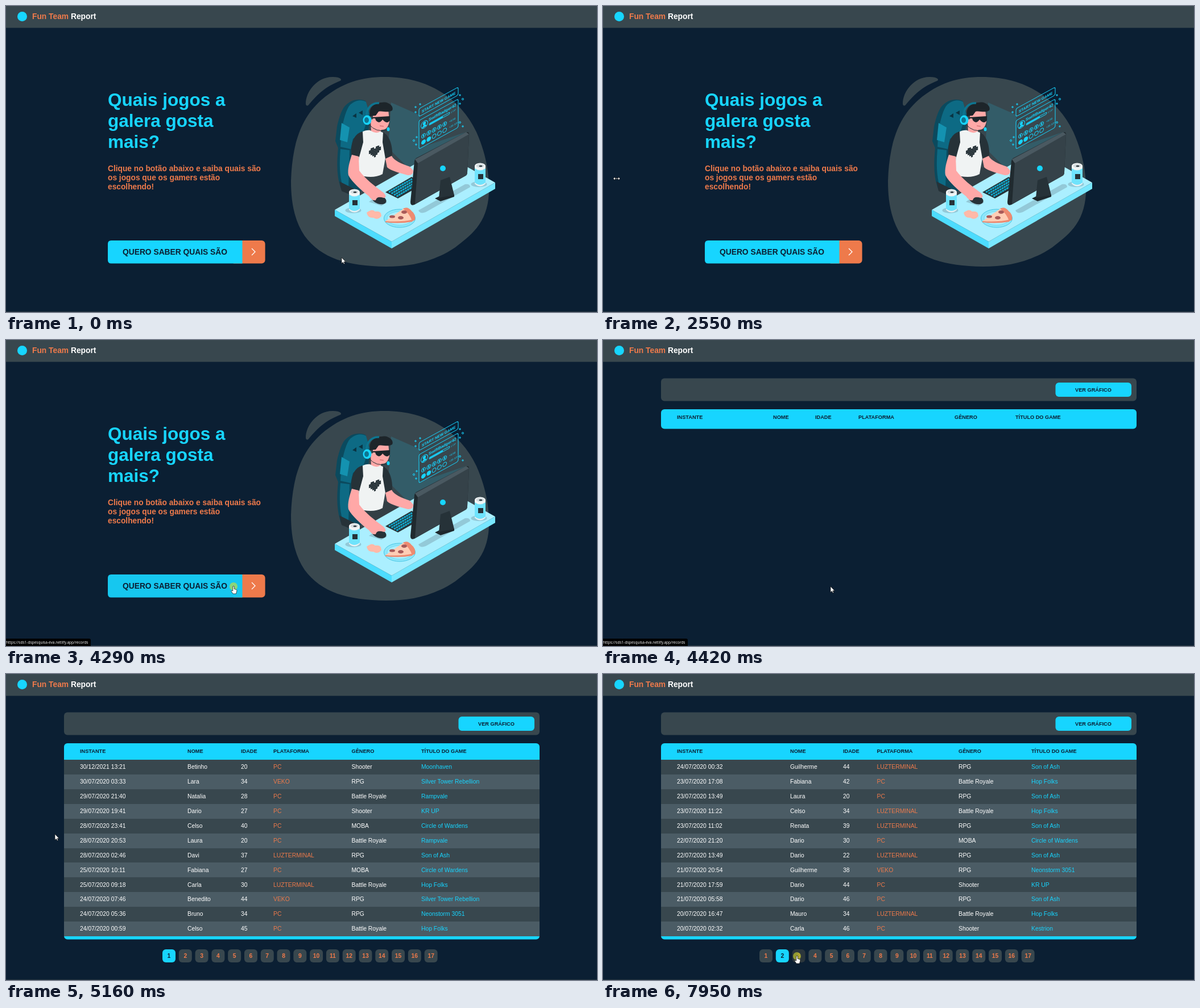
Write an HTML page that moves like this. It is 1039x539 px and loops after 8 s.

```html
<!DOCTYPE html>
<html lang="pt">
<head>
<meta charset="utf-8">
<style>
html, body { margin: 0; width: 100%; height: 100%; overflow: hidden; background: #0b1f33 }
svg { display: block; font-family: "Liberation Sans", Arial, sans-serif }
.b { font-weight: bold }
.cyan { fill: #17d5ff }
.orange { fill: #ee7a4b }
.gray { fill: #38474e }
.ink { fill: #0b1f33 }
.dark { fill: #263238 }
.skin { fill: #ffa8a7 }
.holo { fill: none; stroke: #17d5ff; stroke-width: 1 }
.holo text { fill: #17d5ff; stroke: none }
</style>
</head>
<body>
<svg id="stage" width="1039" height="539" viewBox="0 0 1039 539">
  <g id="home">
    <g class="cyan b" font-size="31.5"><text x="179" y="176">Quais jogos a</text><text x="179" y="213">galera gosta</text><text x="179" y="249.5">mais?</text></g>
    <g class="orange b" font-size="13.75"><text x="179" y="291">Clique no botão abaixo e saiba quais são</text><text x="179" y="307">os jogos que os gamers estão</text><text x="179" y="323">escolhendo!</text></g>
    <rect class="orange" x="395" y="413" width="60.6" height="40.6" rx="6"/>
    <path id="cta" d="M185 413H415.5V453.6H185Q179 453.6 179 447.6V419Q179 413 185 413Z"/>
    <text class="ink b" x="205" y="438" font-size="13.8">QUERO SABER QUAIS SÃO</text>
    <path d="M432 427L438 433L432 439" fill="none" stroke="#fff" stroke-width="1.3"/>

    <g class="gray">
      <path d="M666 125C745 125 800 165 827 222C845 262 850 300 849 330C846 385 815 405 790 425C750 452 710 459 668 459C600 458 555 445 525 405C505 375 501 340 501 308C503 250 515 200 555 165C590 135 625 125 666 125Z"/>
      <path d="M527 172C527 150 548 124 575 125C588 125 592 130 587 132C562 142 548 155 533 173C530 177 527 176 527 172Z"/>
    </g>
    <path class="cyan" opacity=".15" d="M677 170L727 192V250L812 221L720 275L712 290L672 250Z"/>

    <!-- chair -->
    <path fill="#0b4a5e" d="M596 176C606 165 620 162 632 167L640 192L636 232L612 236L618 300L640 318L606 334L590 324C580 300 582 270 584 250L579 238L582 212C586 195 590 183 596 176Z"/>
    <path fill="#0d6a84" d="M605 174C614 166 625 164 633 169L639 190L628 222L610 234L606 252L588 248L590 218C594 198 598 182 605 174Z"/>
    <path fill="#1492b0" d="M590 206L604 214L600 240L587 236Z"/>
    <path fill="#0d6a84" d="M588 252L604 254L602 322L592 318C586 298 586 274 588 252Z"/>
    <path fill="#0a3443" d="M609 194L616 189V197ZM620 188L627 184V192Z"/>
    <path class="dark" d="M586 309L612 322L610 334L590 326Z"/>

    <!-- player -->
    <path fill="#333f45" d="M626 298L668 284L692 296L660 322L634 318Z"/>
    <path class="skin" d="M641 200L673 195V205Q671 219 660 218L657 226L642 224Z"/>
    <path fill="#f0f3f3" d="M626 222C632 218 640 218 642 220Q650 226 658 221L667 225L668 262L662 296C650 303 632 302 619 297L621 250Z"/>
    <path class="dark" d="M627 221C612 225 606 240 607 262L621 266L628 240ZM663 222C674 228 680 245 679 264L667 269L662 240Z"/>
    <path class="skin" d="M645 182H672L674 203Q672 216 662 216L645 211Z"/>
    <path fill="#1d252a" d="M640 194C637 179 647 171 660 170C672 167 683 177 679 184C671 189 662 184 655 186L650 193Z"/>
    <path fill="#1d252a" d="M644 196L675 194V201Q671 208 665 203L662 200Q656 209 650 201L649 198H644Z"/>
    <path d="M657 211L664 212" stroke="#c45c62"/>
    <path d="M634 196C633 178 645 170 656 171" fill="none" stroke="#0e7590" stroke-width="3.5"/>
    <path d="M638 208Q650 224 671 218" fill="none" stroke="#263238"/>
    <ellipse class="cyan" cx="672" cy="217" rx="2.5" ry="3.5"/>
    <ellipse class="cyan" cx="635" cy="201" rx="7.5" ry="8.5"/>
    <ellipse cx="634" cy="201" rx="4" ry="5" fill="#0e7590"/>
    <g id="heart" class="dark" transform="translate(638 252) skewY(-20)"></g>

    <!-- desk -->
    <path fill="#abefff" d="M578 359L678 415L860 311L760 255Z"/>
    <path fill="#4ddcfe" d="M578 359L678 415V427L578 370Z"/>
    <path fill="#78e7ff" d="M678 415L860 311V322L678 427Z"/>
    <path fill="#93c9d8" d="M725 360L807 314Q816 313 816 319L738 363Q728 367 725 360ZM638 345L660 352L670 346L650 336Z"/>
    <path class="dark" d="M667 328L713 301L735 313L689 339Z"/>
    <path d="M673 328L714 304.5M677.5 330.5L718 307M682 333L722 309.5M686.5 335.5L726 312" stroke="#12aacc" stroke-width="3" stroke-dasharray="3.6 .8"/>
    <ellipse class="dark" cx="656" cy="341" rx="13" ry="7.5" transform="rotate(18 656 341)"/>
    <path class="skin" d="M608 262L620 265L621 290C632 305 648 317 664 329Q671 337 664 338Q652 334 650 342Q644 344 638 335C625 325 608 310 602 298C600 288 604 274 608 262ZM667 269L678 264C682 272 695 278 710 283L716 290Q716 299 706 298C692 294 676 290 670 284Z"/>
    <path fill="#ffb9a8" d="M634 364Q644 356 649 362Q660 360 660 370Q654 378 646 373Q636 374 634 364Z"/>

    <!-- pizza -->
    <ellipse cx="692" cy="374" rx="27.5" ry="16" fill="#8ee6fa" stroke="#45c6e4"/>
    <ellipse cx="692" cy="374" rx="22" ry="12" fill="#abefff" stroke="#6fdcf4"/>
    <path fill="#ffcdb5" d="M667 379L700 356L718 376Q700 382 667 379Z"/>
    <path fill="#ee8a70" d="M698 357Q706 352 713 361Q721 367 719 377L714 379Q710 366 698 357Z"/>
    <path fill="#ee8a70" d="M667 379Q696 381 716 376L714 380Q692 384 667 381Z"/>
    <g fill="#a95a59"><ellipse cx="679" cy="371" rx="5" ry="2.5"/><ellipse cx="700" cy="363" rx="5" ry="3"/><ellipse cx="694" cy="373" rx="5" ry="3"/></g>

    <!-- monitor -->
    <path fill="#1e282d" d="M754 339L766 333L788 332V336L764 344Z"/>
    <path fill="#202a2f" d="M718 273Q718 270 721 268L809 222Q815 221 814 228L811 293Q811 297 808 299L718 350Q711 353 711 345Z"/>
    <path fill="#354249" d="M724 276L814 226L811 293Q811 297 808 299L719 349Z"/>
    <path fill="#4a5961" d="M719 270L809 222L814 226L724 277Z"/>
    <path class="dark" d="M764 307L780 301L788 333L761 338Z"/>
    <circle class="cyan" cx="768" cy="286" r="5"/>
    <g id="cans"></g>

    <!-- floating panels -->
    <g class="holo">
      <g transform="translate(726 181) skewY(-29)"><rect width="69" height="14" rx="3"/><text x="5" y="10" font-size="6.5" class="b">START NEW GAME</text></g>
      <g transform="translate(726 202) skewY(-29)"><rect width="69" height="50" rx="3"/><text x="17" y="10.5" font-size="7" class="b">SwiftBadger42</text>
        <circle cx="9.5" cy="12" r="6"/><circle class="cyan" cx="9.5" cy="10" r="2.2"/><path class="cyan" d="M6 16Q9.5 10 13 16Z"/>
        <rect x="18" y="15" width="36" height="3" rx="1.5"/><path d="M19 16.5H42" stroke-width="2"/>
        <text x="56" y="18" font-size="4">1 UP</text><text x="53" y="33" font-size="4.5">+9,60</text><text x="53" y="43" font-size="4.5">+30 XP</text>
        <g id="badges"></g>
      </g>
      <path id="sparks"/>
      <g><circle cx="803" cy="164" r="1.5"/><circle cx="717" cy="237" r="1.5"/><circle cx="798" cy="205" r="1.5"/></g>
    </g>
  </g>

  <g id="records">
    <rect class="gray" x="102" y="67.5" width="836" height="40" rx="6"/>
    <rect class="cyan" x="795.5" y="75" width="133.5" height="25" rx="6"/>
    <text class="ink b" x="862" y="90.5" font-size="9.2" text-anchor="middle">VER GRÁFICO</text>
    <g id="tables"></g>
    <g id="pager" class="b" font-size="10.35" text-anchor="middle"></g>
  </g>

  <rect class="gray" width="1039" height="38.5"/>
  <circle class="cyan" cx="28.5" cy="18.5" r="8.5"/>
  <text class="b orange" x="46" y="22.5" font-size="13.8">Fun Team <tspan fill="#fff">Report</tspan></text>
  <rect y="538" width="1039" height="1" fill="#26343f"/>
  <g id="status"><path d="M0 526H146Q149 526 149 529V539H0Z"/><text y="534.5" fill="#fff" font-size="6.55" font-family="Open Sans, sans-serif">https://sds1-dspesquisa-eva.netlify.app/records</text></g>

  <g id="pointer" stroke-linejoin="round">
    <circle id="click" r="7" fill="#d8e02c" opacity=".6"/>
    <path id="shape" stroke="#111" stroke-width=".7"/>
  </g>
</svg>
<script>
const $ = id => document.getElementById(id);
const show = (id, on) => $(id).setAttribute('display', on ? 'inline' : 'none');
const range = n => [...Array(n).keys()];

$('heart').innerHTML = ['0110110', '1111111', '1111111', '0111110', '0011100', '0001000']
  .map((row, y) => [...row].map((c, x) => +c ? `<rect x="${x * 3}" y="${y * 3}" width="3.1" height="3.1"/>` : '').join('')).join('');

$('cans').innerHTML = [[612.5, 322], [833.5, 276]].map(([x, y]) => `<g transform="translate(${x} ${y})">
  <ellipse cx="-2" cy="38" rx="14" ry="5" fill="#93c9d8"/>
  <path fill="#e9f2f4" d="M-9.5 5V37Q0 46 9.5 37V5Z"/><path fill="#6fe3fc" d="M-9.5 10Q0 17 9.5 10V35Q0 43 -9.5 35Z"/>
  <ellipse cy="6" rx="9.5" ry="5.5" fill="#f4f7f7"/><ellipse cy="5.5" rx="7" ry="3.5" fill="#d5dde0"/><ellipse cx="1" cy="6" rx="3" ry="1.3" class="dark"/>
  <rect class="dark" x="-3.5" y="20" width="9" height="9"/></g>`).join('');

$('badges').innerHTML = range(10).map(i => {
  const x = 8 + i % 5 * 9.3, y = i < 5 ? 31 : 42;
  return `<circle cx="${x}" cy="${y}" r="3.4" ${i > 4 && i < 7 ? 'class="cyan"' : ''}/>` + (i < 5 ? `<path d="M${x} ${y - 2}V${y + 2}" stroke-width="2"/>` : '');
}).join('');

$('sparks').setAttribute('d', [[728, 173], [720, 178], [720, 187], [798, 157], [798, 172], [722, 231], [721, 244], [803, 212]]
  .map(([x, y]) => `M${x - 2} ${y}h4m-2 -2v4`).join(''));

const heads = ['INSTANTE', 'NOME', 'IDADE', 'PLATAFORMA', 'GÊNERO', 'TÍTULO DO GAME'];
const pages = [
  { cols: [130, 299, 373, 449, 618, 725], rows: [] },
  { cols: [130, 319, 413, 470, 607.5, 730], rows: `30/12/2021 13:21|Betinho|20|PC|Shooter|Moonhaven
30/07/2020 03:33|Lara|34|VEKO|RPG|Silver Tower Rebellion
29/07/2020 21:40|Natalia|28|PC|Battle Royale|Rampvale
29/07/2020 19:41|Dario|27|PC|Shooter|KR UP
28/07/2020 23:41|Celso|40|PC|MOBA|Circle of Wardens
28/07/2020 20:53|Laura|20|PC|Battle Royale|Rampvale
28/07/2020 02:46|Davi|37|LUZTERMINAL|RPG|Son of Ash
25/07/2020 10:11|Fabiana|27|PC|MOBA|Circle of Wardens
25/07/2020 09:18|Carla|30|LUZTERMINAL|Battle Royale|Hop Folks
24/07/2020 07:46|Benedito|44|VEKO|RPG|Silver Tower Rebellion
24/07/2020 05:36|Bruno|34|PC|RPG|Neonstorm 3051
24/07/2020 00:59|Celso|45|PC|Battle Royale|Hop Folks`.split('\n') },
  { cols: [130, 329, 422, 481.5, 625, 753], rows: `24/07/2020 00:32|Guilherme|44|LUZTERMINAL|RPG|Son of Ash
23/07/2020 17:08|Fabiana|42|PC|Battle Royale|Hop Folks
23/07/2020 13:49|Laura|20|PC|RPG|Son of Ash
23/07/2020 11:22|Celso|34|LUZTERMINAL|Battle Royale|Hop Folks
23/07/2020 11:02|Renata|39|LUZTERMINAL|RPG|Son of Ash
22/07/2020 21:20|Dario|30|PC|MOBA|Circle of Wardens
22/07/2020 13:49|Dario|22|LUZTERMINAL|RPG|Son of Ash
21/07/2020 20:54|Guilherme|38|VEKO|RPG|Neonstorm 3051
21/07/2020 17:59|Dario|44|PC|Shooter|KR UP
21/07/2020 05:58|Dario|46|PC|RPG|Son of Ash
20/07/2020 16:47|Mauro|34|LUZTERMINAL|Battle Royale|Hop Folks
20/07/2020 02:32|Carla|46|PC|Shooter|Kestrion`.split('\n') }
];
const fills = ['#fff', '#fff', '#fff', '#ee7a4b', '#fff', '#17d5ff'];
const rowH = 25.92;

$('tables').innerHTML = pages.map(({ cols, rows }, p) => `<g id="table${p}">
  <rect class="cyan" x="102" y="122" width="836" height="${rows.length ? 345.5 : 34.5}" rx="6"/>
  <g class="ink b" font-size="9.2">${heads.map((h, i) => `<text x="${cols[i]}" y="139.3">${h}</text>`).join('')}</g>
  <g font-size="10.35">${rows.map((row, r) => `<rect x="102" y="${151 + r * rowH}" width="836" height="${rowH}" shape-rendering="crispEdges" fill="${r % 2 ? '#4b5c65' : '#38474e'}"/>` +
    row.split('|').map((s, i) => `<text x="${cols[i]}" y="${167.2 + r * rowH}" fill="${fills[i]}">${s}</text>`).join('')).join('')}</g></g>`).join('');

const pageX = i => 275 + i * 28.79;
$('pager').innerHTML = range(17).map(i =>
  `<g><rect x="${pageX(i)}" y="485" width="23" height="23" rx="6"/><text x="${pageX(i) + 11.5}" y="500.2">${i + 1}</text></g>`).join('');

const shapes = {
  arrow: 'M0 0V10.5L2.4 8.3L4 11.6L5.6 10.9L4.1 7.7H7.3Z',
  hand: 'M-1.2 0Q0 -1 1.2 0V4.6L5 5.6Q6 6 5.8 8L4.5 13H-1L-4 8.4Q-4 6.2 -1.2 8Z',
  resize: 'M-6 0L-3 -3V-.8H3V-3L6 0L3 3V.8H-3V3Z',
  beam: 'M-2.2 -5H2.2V-4.2H.5V4.2H2.2V5H-2.2V4.2H-.5V-4.2H-2.2Z'
};

// Pointer moves: start, end, number of steps, evenly spaced way points.
const moves = [
  [0, 1, 1, [[590, 443]]],
  [70, 280, 4, [[440, 424], [290, 404], [129, 383], [-40, 360]]],
  [2550, 3290, 12, [[24, 304], [70, 286], [160, 335], [255, 400], [310, 440], [330, 451]]],
  [3420, 4020, 9, [[340, 448], [365, 440], [390, 435], [400, 434]]],
  [4750, 5230, 8, [[398, 432], [396, 430], [392, 427], [380, 420], [355, 408], [314, 391], [86, 282], [-40, 222]]],
  [5490, 6290, 13, [[2, 230], [140, 90], [380, 36], [640, 120], [560, 260], [400, 370], [308, 433]]],
  [6370, 6620, 5, [[308, 440], [307, 452], [308, 470], [310, 486], [312, 493]]],
  [6760, 7350, 8, [[312, 493], [312, 493], [325, 496], [347, 500]]],
  [7550, 7680, 3, [[345, 499], [343, 498], [341, 497]]]
];

function pointerAt(t) {
  const [start, end, steps, pts] = moves.findLast(m => t >= m[0]);
  const last = Math.max(steps - 1, 1);
  const k = Math.min(Math.floor((t - start) / (end - start) * last + .1), last) / last;
  const at = k * (pts.length - 1), i = Math.floor(at);
  const a = pts[i], b = pts[i + 1] || a;
  return a.map((v, j) => v + (b[j] - v) * (at - i));
}

function draw(t) {
  const [x, y] = pointerAt(t);
  const home = t < 4420, loaded = t >= 5160;
  const table = !loaded ? 0 : t < 6830 ? 1 : 2;
  const over = (l, top, w, h) => x >= l && x <= l + w && y >= top && y <= top + h;

  show('home', home);
  show('records', !home);
  pages.forEach((_, p) => show('table' + p, p === table));
  show('pager', loaded);
  show('status', t >= 3490 && t < 4820);

  let link = home && over(179, 413, 276, 40);
  $('cta').setAttribute('fill', link ? '#16c7ef' : '#17d5ff');
  [...$('pager').children].forEach((g, i) => {
    const hover = loaded && over(pageX(i), 485, 23, 23), active = i === table - 1;
    link ||= hover;
    g.children[0].setAttribute('fill', active ? '#17d5ff' : hover ? '#2b363c' : '#38474e');
    g.children[1].setAttribute('fill', active ? '#0b1f33' : hover ? '#a45b40' : '#ee7a4b');
  });

  const kind = t >= 2550 && t < 2610 ? 'resize' : t >= 5015 && t < 5150 ? 'beam' : link ? 'hand' : 'arrow';
  $('pointer').setAttribute('transform', `translate(${x} ${y})`);
  $('shape').setAttribute('d', shapes[kind]);
  $('shape').setAttribute('fill', kind === 'beam' ? '#ccc' : '#fff');
  $('shape').setAttribute('stroke-width', kind === 'beam' ? 0 : .7);
  show('click', t >= 4290 && t < 4420 || t >= 6760 && t < 6900 || t >= 7950);
}

function frame() {
  draw(performance.now() % 8000);
  requestAnimationFrame(frame);
}
frame();
</script>
</body>
</html>
```
